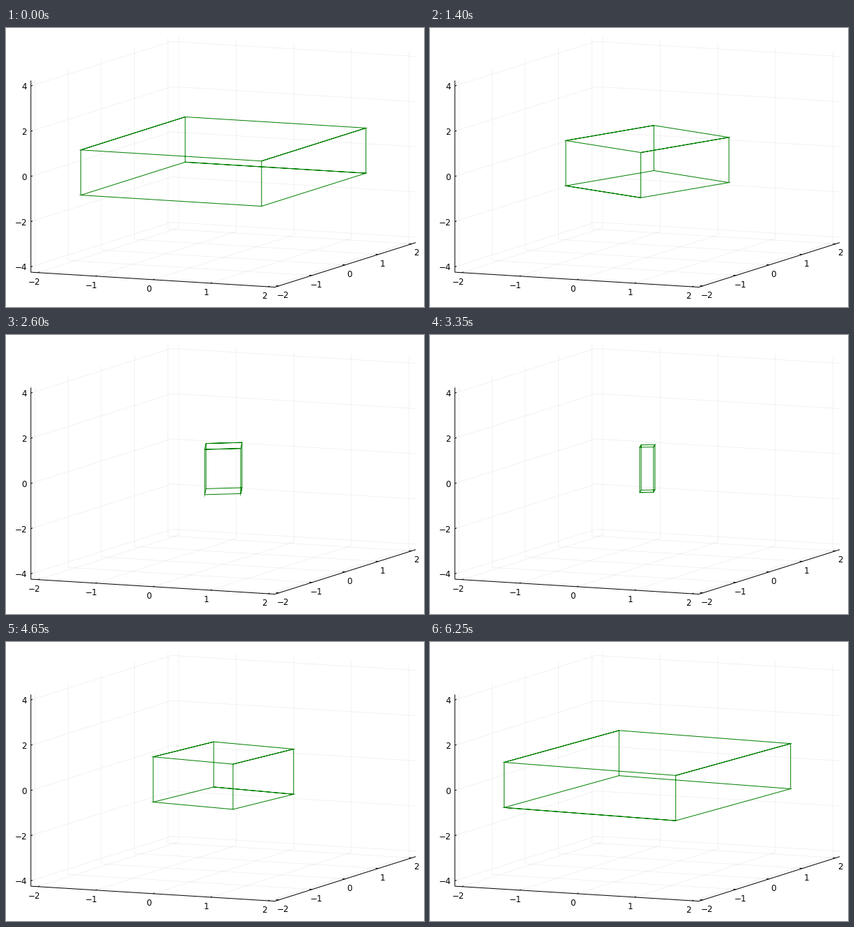
A matplotlib script that plays this animation: 600 px wide and 400 px high, repeating every 6300 ms.

```python
import numpy as np
import matplotlib.pyplot as plt
from matplotlib.animation import FuncAnimation
from matplotlib.collections import PolyCollection

plt.rcParams["path.simplify"] = False

DPI = 100
PX = 72 / DPI
FRAMES, INTERVAL = 126, 50
LIM, ZLIM = 2.12, 4.24

# Parallel projection: screen vectors of the data axes around the centre.
CENTER = np.array([312.0, 191.5])
BASIS = np.array([[82.6, 5.06], [47.7, -15.07], [0, -32.4]])


def project(points):
    return CENTER + np.asarray(points, float) @ BASIS


fig = plt.figure(figsize=(600 / DPI, 400 / DPI), dpi=DPI, facecolor="white")
ax = fig.add_axes([0, 0, 1, 1])
ax.set(xlim=(0, 600), ylim=(400, 0))
ax.axis("off")


def line(points, color="black", width=1.0, **kw):
    x, y = project(points).T
    return ax.plot(x, y, color=color, lw=width * PX, solid_capstyle="butt",
                   solid_joinstyle="bevel", snap=False, **kw)[0]


def label(value, point, dx, dy, ha="center"):
    x, y = project(point)
    text = str(value).replace("-", "\u2212")
    ax.text(x + dx, y + dy, text, ha=ha, va="center_baseline",
            family="DejaVu Sans", fontsize=12 * PX)


def grid(points):
    line(points, width=0.5, alpha=0.1, zorder=1)


TICK = 0.012 * 2 * LIM
for v in range(-2, 3):
    grid([(v, -LIM, -ZLIM), (v, LIM, -ZLIM), (v, LIM, ZLIM)])
    grid([(LIM, v, -ZLIM), (-LIM, v, -ZLIM), (-LIM, v, ZLIM)])
    grid([(-LIM, -LIM, 2 * v), (-LIM, LIM, 2 * v), (LIM, LIM, 2 * v)])

    on_x, on_y, on_z = (v, -LIM, -ZLIM), (LIM, v, -ZLIM), (-LIM, -LIM, 2 * v)
    line([on_x, (v, -LIM + TICK, -ZLIM)])
    line([on_y, (LIM - TICK, v, -ZLIM)])
    line([on_z, (-LIM, -LIM + TICK, 2 * v)])
    label(v, on_x, -5.5, 12)
    label(v, on_y, 6, 12)
    label(2 * v, on_z, -5.7, 0, ha="right")

line([(-LIM, -LIM, ZLIM), (-LIM, -LIM, -ZLIM), (LIM, -LIM, -ZLIM), (LIM, LIM, -ZLIM)])

# One stroke over all edges: corners 0-3 are the bottom, 4-7 the top.
ROUTE = [0, 1, 2, 3, 0, 4, 5, 6, 7, 4, 5, 1, 2, 6, 7, 3]
box = line([(0, 0, 0)] * len(ROUTE), color="green", zorder=3)
tips = PolyCollection([], facecolor="green", edgecolor="none", zorder=3)
ax.add_collection(tips, autolim=False)


def unit(v):
    return v / max(np.hypot(*v), 1e-9)


def miter(prev, p, after, half=0.5, limit=10):
    """Triangle that sharpens the outer side of a bevelled join."""
    u, v = unit(prev - p), unit(after - p)
    out = -unit(u + v)
    sine = abs(u[0] * out[1] - u[1] * out[0])
    if sine * limit < 1:
        return None
    sides = []
    for d in (u, v):
        n = np.array([-d[1], d[0]])
        sides.append(p + half * n * np.sign(n @ out))
    return [sides[0], p + out * half / sine, sides[1]]


def update(k):
    t = 0.05 * k
    radius = (np.pi - t) / np.sqrt(2)
    a = 2 * t - np.pi / 4 + np.arange(4) * np.pi / 2
    ring = np.column_stack([radius * np.cos(a), radius * np.sin(a)])
    corners = [(x, y, z) for z in (-1, 1) for x, y in ring]
    path = project(corners)[ROUTE]
    box.set_data(*path.T)
    joins = (miter(*path[i:i + 3]) for i in range(len(path) - 2))
    tips.set_verts([j for j in joins if j is not None])
    return box, tips


anim = FuncAnimation(fig, update, frames=FRAMES, interval=INTERVAL,
                     repeat=True, repeat_delay=0, blit=False)
plt.show()
```
